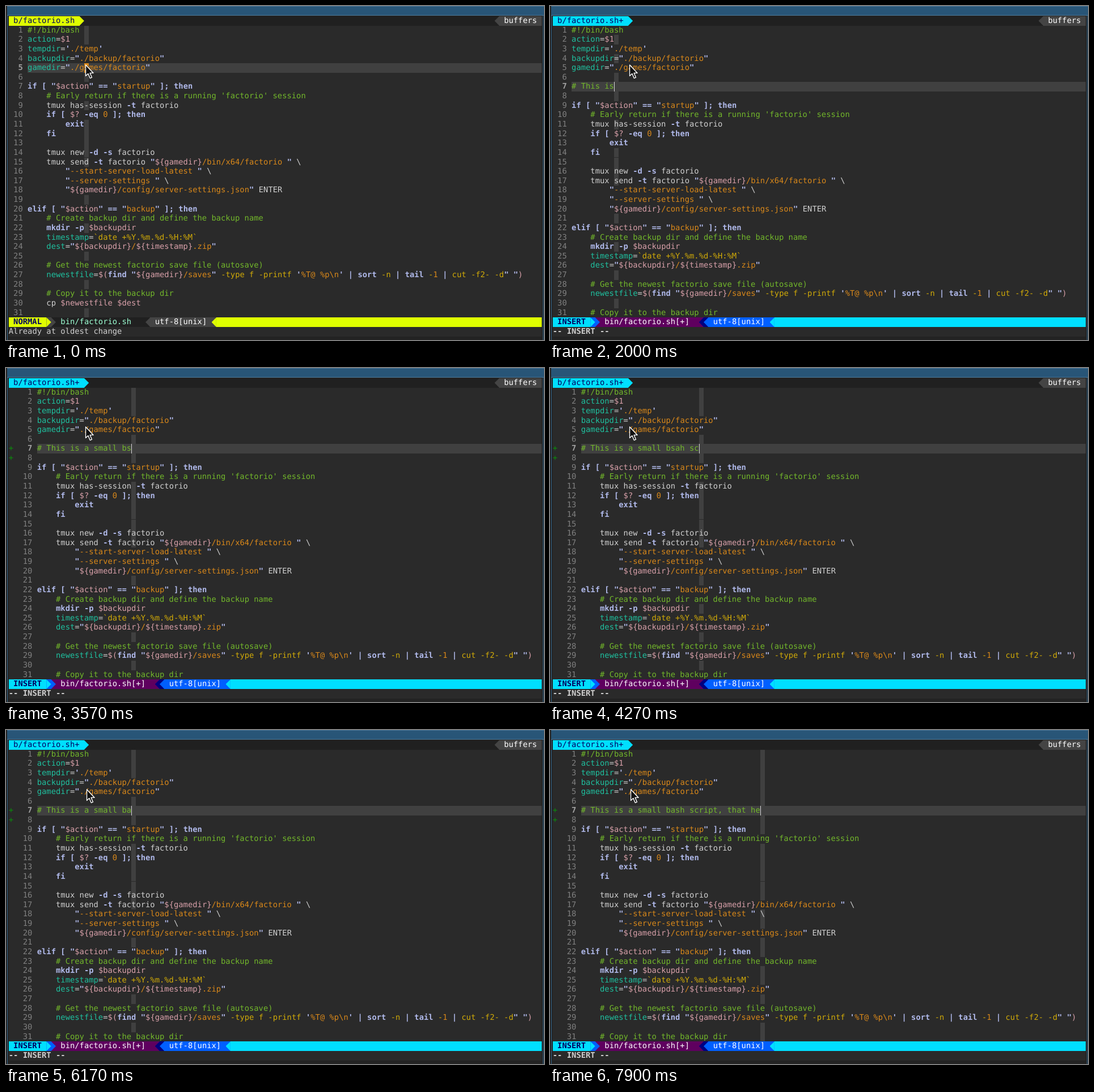
Animation, 949 px wide and 590 px high, one loop 8 s. Source, as an HTML page:

```html
<!DOCTYPE html>
<html lang="en">
<head>
<meta charset="utf-8">
<title>Editing a shell script</title>
<style>
  html, body { margin: 0; width: 100%; height: 100%; overflow: hidden; background: #232323; }
  #stage { position: relative; width: 949px; height: 590px; overflow: hidden; background: #232323; }
  #stage div, #stage svg { position: absolute; }
  #title { left: 2px; top: 0; width: 947px; height: 17px; box-sizing: border-box; background: #285577; border: solid #4c7899; border-width: 1px 0; }
  .edge { top: 0; width: 1px; height: 590px; background: #33668c; }
  #screen span {
    position: absolute; white-space: pre; color: #d0d0d0;
    font: 13.82px/17.8px "DejaVu Sans Mono", monospace;
    text-rendering: geometricPrecision; font-variant-ligatures: none;
  }
  #screen .c { color: #72b72b; }
  #screen .i { color: #1fc09f; }
  #screen .s { color: #d9881a; }
  #screen .v { color: #d8a0a9; }
  #screen .g { color: #d0aa08; }
  #screen .k { color: #b0b9ea; font-weight: bold; }
  #screen .n { color: #808080; }
  #screen .now { color: #a0a0a0; font-weight: bold; }
  #screen .sign { color: #0a8f0a; }
  #screen .msg { font-weight: bold; }
  #screen .dark { color: #2a2a2a; }
  #screen .navy { color: #00005f; }
  #screen .mode { color: #00005f; font-weight: bold; }
  #screen .mint { color: #9cffd3; }
  #screen .white { color: #fff; }
  .right { clip-path: polygon(0 0, 100% 50%, 0 100%); }
  .left { clip-path: polygon(100% 0, 0 50%, 100% 100%); }
  #pointer { left: 0; top: 0; }
</style>
</head>
<body>
<div id="stage">
  <div class="edge" style="left:2px"></div>
  <div class="edge" style="left:947px"></div>
  <div id="title"></div>
  <div id="screen"></div>
  <svg id="pointer" width="18" height="28" viewBox="0 0 18 28">
    <path d="M1 1V20.5L5.4 16.6L8.8 24.6L12 23.2L8.6 15.4H14.6Z" fill="#111" stroke="#fff" stroke-width="1.4" stroke-linejoin="round"/>
  </svg>
</div>

<!-- "~x" switches the colour class; ~p is plain text -->
<script type="text/plain" id="code">
~c#!/bin/bash
~iaction~p=~v$1
~itempdir~p=~k'~s./temp~k'
~ibackupdir~p=~k"~s./backup/factorio~k"
~igamedir~p=~k"~s./games/factorio~k"

~kif [~p ~k"~v$action~k"~p ~k==~p ~k"~sstartup~k"~p ~k];~p ~kthen
    ~c# Early return if there is a running 'factorio' session
    tmux has-session ~k-t~p factorio
    ~kif [~p ~v$?~p ~k-eq~p ~s0~p ~k];~p ~kthen
        ~kexit
    ~kfi

    tmux new ~k-d~p ~k-s~p factorio
    tmux send ~k-t~p factorio ~k"~v${gamedir}~s/bin/x64/factorio ~k"~p \
        ~k"~s--start-server-load-latest ~k"~p \
        ~k"~s--server-settings ~k"~p \
        ~k"~v${gamedir}~s/config/server-settings.json~k"~p ENTER

~kelif [~p ~k"~v$action~k"~p ~k==~p ~k"~sbackup~k"~p ~k];~p ~kthen
    ~c# Create backup dir and define the backup name
    ~kmkdir~p ~k-p~p ~v$backupdir
    ~itimestamp~p=~g`date +%Y.%m.%d-%H:%M`
    ~idest~p=~k"~v${backupdir}~s/~v${timestamp}~s.zip~k"

    ~c# Get the newest factorio save file (autosave)
    ~inewestfile~p=~v$(~kfind~g ~k"~v${gamedir}~s/saves~k"~g -type f -printf ~k'~s%T@ %p\n~k'~g ~k|~g ~ksort~g -n ~k|~g ~ktail~g -~s1~g ~k|~g cut -f2- -d~k" "~v)

    ~c# Copy it to the backup dir
    cp ~v$newestfile~p ~v$dest

</script>

<script>
const LOOP = 8000, ROWS = 31, COLS = 113;
const CW = 8.32, RH = 16.633, X0 = 4.8, Y0 = 18;
const BG = '#2a2a2a', LIT = '#404040', BAR = '#202020', GREY = '#444444';
const STATUS = ROWS + 1, MESSAGE = ROWS + 2;

const source = document.getElementById('code').textContent.split('\n').slice(1, ROWS + 1);
const screenEl = document.getElementById('screen');
const pointer = document.getElementById('pointer');

// Keystrokes; "<" is a backspace
const keys = [];
function type(start, end, strokes) {
  const list = [...strokes];
  list.forEach((stroke, i) => {
    const time = start + (end - start) * i / Math.max(1, list.length - 1);
    for (const ch of stroke) keys.push({ time, ch });
  });
}
type(1000, 1100, '# ');
type(1330, 2100, 'This is a');
type(2200, 2200, ' ');
type(2370, 2470, 'sm');
type(2630, 2870, 'all ');
type(3430, 3430, 'b');
type(3570, 3870, ['s', 'a', 'h', ' ', 'sc']);
type(4070, 4070, 'r');
type(4270, 4270, '<');
type(5170, 5170, ['<<<<<<<']);
type(5570, 5600, 'bs');
type(5970, 6170, '<<ba');
type(6270, 6630, 'sh sc');
type(6830, 7030, 'ript');
type(7170, 7230, ', ');
type(7370, 7900, 'that he');

function stateAt(t) {
  let text = '';
  for (const { time, ch } of keys) {
    if (time <= t) text = ch === '<' ? text.slice(0, -1) : text + ch;
  }
  const edited = t >= 500;
  const insert = edited && !(t >= 4500 && t < 5170);
  let col = text.length;
  if (!edited) col = 12;
  else if (!insert) col = t < 4970 ? 24 : 18;
  return {
    text, edited, insert, col,
    line: !edited ? 5 : t < 730 ? 6 : 7,
    signs: t >= 3230,
    nudged: t >= 5370
  };
}

function parse(line) {
  const tokens = [];
  let col = 0;
  for (const part of ('~p' + line).split('~').slice(1)) {
    const str = part.slice(1);
    if (str) tokens.push({ cls: part[0], str, col });
    col += str.length;
  }
  return tokens;
}

const px = (prop, n) => `${prop}:${n.toFixed(2)}px;`;
const place = (col, row) => px('left', X0 + col * CW) + px('top', Y0 + row * RH);
const box = (col, row, cells, color, cls = '', rows = 1) =>
  `<div class="${cls}" style="${place(col, row)}${px('width', cells * CW)}${px('height', rows * RH)}background:${color}"></div>`;
const label = (col, row, str, cls) => `<span class="${cls}" style="${place(col, row)}">${str}</span>`;
const arrow = (col, row, color, back, dir) => box(col, row, 1, back) + box(col, row, 1, color, dir);

function drawTabs(s) {
  const color = s.edited ? '#00dfff' : '#dfff00';
  const name = s.edited ? 'b/factorio.sh+' : 'b/factorio.sh';
  const end = name.length + 2;
  return box(0, 0, COLS, BAR) + box(0, 0, end, color) + label(1, 0, name, 'navy')
    + arrow(end, 0, color, BAR, 'right')
    + arrow(103, 0, GREY, BAR, 'left') + box(104, 0, 9, GREY) + label(105, 0, 'buffers', 'white');
}

function drawStatus(s) {
  const main = s.insert ? '#00dfff' : '#dfff00';
  const side = s.insert ? '#005fff' : GREY;
  const mid = s.edited ? '#5f005f' : BAR;
  const gap = s.insert ? '#000080' : BAR;
  const mode = s.insert ? 'INSERT' : 'NORMAL';
  const file = s.edited ? 'bin/factorio.sh[+]' : 'bin/factorio.sh';
  const end = 11 + file.length;
  const r = STATUS;
  return box(0, r, 8, main) + label(1, r, mode, 'mode')
    + arrow(8, r, main, side, 'right') + arrow(9, r, side, mid, 'right')
    + box(10, r, end - 8, mid) + label(11, r, file, s.edited ? 'white' : 'mint')
    + arrow(end + 2, r, gap, mid, 'left') + arrow(end + 3, r, side, gap, 'left')
    + box(end + 4, r, 13, side) + label(end + 5, r, 'utf-8[unix]', 'white')
    + arrow(end + 17, r, main, side, 'left') + box(end + 18, r, COLS - end - 18, main);
}

function drawCode(s) {
  const lines = source.slice();
  if (s.edited) lines.splice(5, 0, ...(s.line === 6 ? [''] : ['', '~c' + s.text]));
  const shift = s.signs ? 2 : 0;
  const left = 4 + shift;
  let html = '';
  lines.slice(0, ROWS).forEach((line, i) => {
    const row = i + 1;
    const active = row === s.line;
    const tokens = parse(line);
    const under = tokens.find(k => s.col >= k.col && s.col < k.col + k.str.length);
    // The cursor column shows only behind plain text and blanks
    if (active) html += box(left, row, COLS - left, LIT);
    else if (!under || under.cls === 'p') html += box(left + s.col, row, 1, LIT);
    html += label(shift, row, String(row).padStart(3), active ? 'now' : 'n');
    if (s.signs && (row === 7 || row === 8)) html += label(0, row, '+', 'sign');
    for (const k of tokens) html += label(left + k.col, row, k.str, k.cls);
    if (active && !s.insert && under) {
      const color = under.cls === 's' ? '#d9881a' : '#72b72b';
      html += box(left + s.col, row, 1, color)
        + label(left + s.col, row, under.str[s.col - under.col], 'dark');
    }
  });
  if (s.insert) html += box(left + s.col, s.line, 1 / CW, '#d8d8d8');
  return html;
}

function draw(s) {
  const message = s.insert ? '-- INSERT --' : s.edited ? '' : 'Already at oldest change';
  screenEl.innerHTML = box(0, 1, COLS, BG, '', ROWS) + box(0, MESSAGE, COLS, BG)
    + drawTabs(s) + drawCode(s) + drawStatus(s)
    + label(0, MESSAGE, message, s.insert ? 'msg' : '');
  pointer.style.transform = s.nudged ? 'translate(141.5px, 104px)' : 'translate(139.5px, 103px)';
}

let shown = '';
function tick() {
  const s = stateAt(performance.now() % LOOP);
  const key = JSON.stringify(s);
  if (key !== shown) {
    shown = key;
    draw(s);
  }
  requestAnimationFrame(tick);
}
tick();
</script>
</body>
</html>
```
